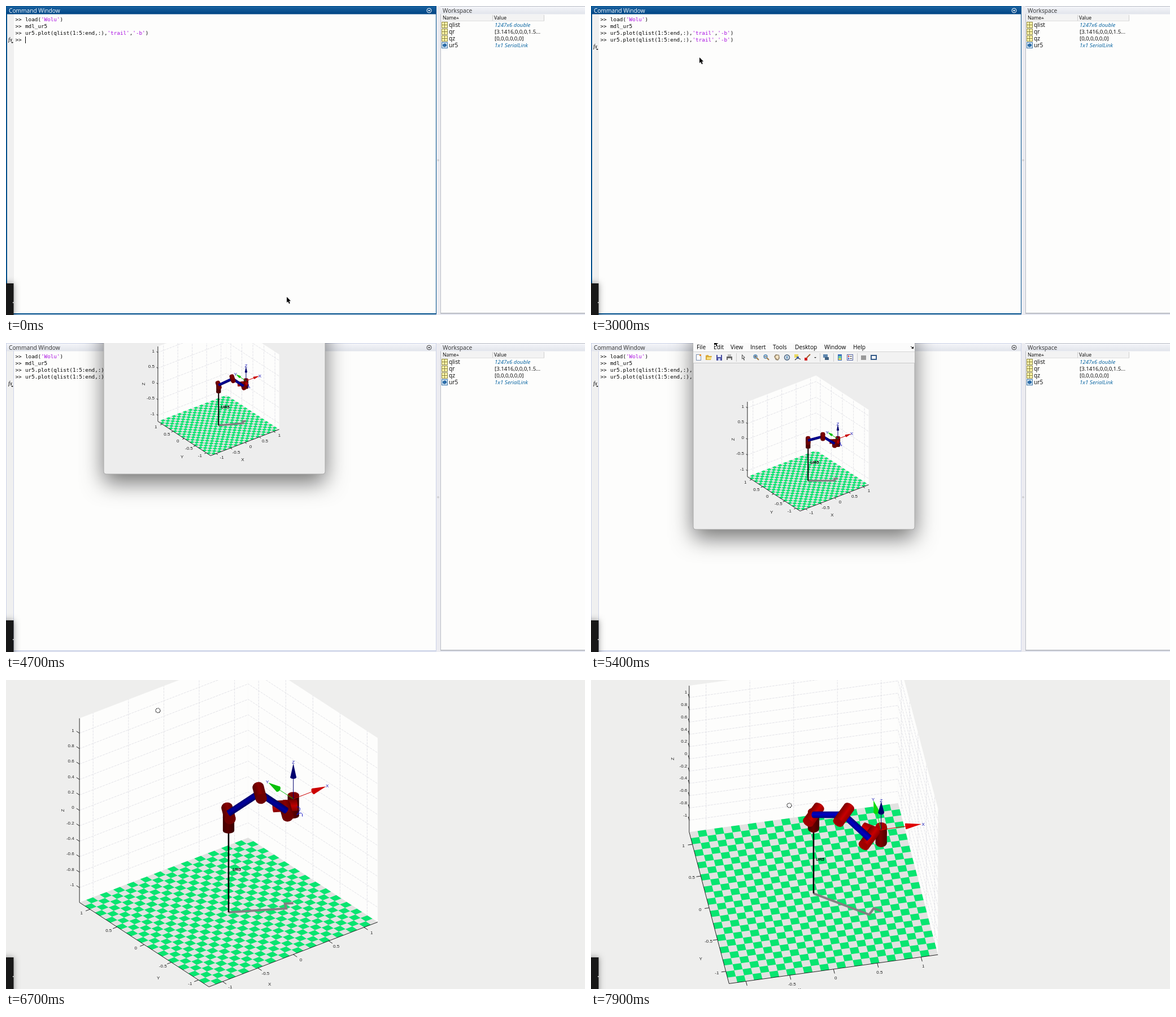
Recreate the animation shown at these times as an HTML page with a canvas. Size 1025x547 px, loop 8000 ms.

```html
<!DOCTYPE html>
<html lang="en">
<head>
<meta charset="utf-8">
<title>Robot arm plot</title>
<style>
html, body { margin: 0; width: 100%; height: 100%; overflow: hidden; background: #efefef; }
canvas { display: block; width: 1025px; height: 547px; }
</style>
</head>
<body>
<canvas id="stage" width="1025" height="547"></canvas>
<script>
const ctx = document.getElementById('stage').getContext('2d');
const LOOP = 8000, STEP = 100;
const R = 1.1928, TILES = 25; // half the plot's width, floor tiles per side
const UI = '10.2px "Open Sans", sans-serif';
const MONO = '9.3px "DejaVu Sans Mono", monospace';
const PLOT = '8px "Liberation Sans", Arial, sans-serif';
const { sin, cos, abs, hypot, atan2, PI } = Math;
const rad = d => d * PI / 180;
const mix = (a, b, k) => a + (b - a) * k;
const clamp = v => Math.max(0, Math.min(1, v));
const ramp = (t, a, b) => clamp((t - a) / (b - a));
const ease = k => k * k * (3 - 2 * k);
const add = (a, b, k = 1) => a.map((v, i) => v + b[i] * k);

// Interpolates rows of [time, ...values].
function track(t, rows) {
  let i = 0;
  while (i < rows.length - 2 && t >= rows[i + 1][0]) i++;
  const a = rows[i], b = rows[i + 1], k = ease(ramp(t, a[0], b[0]));
  return a.slice(1).map((v, n) => mix(v, b[n + 1], k));
}

function rect(x, y, w, h, fill) {
  ctx.fillStyle = fill;
  ctx.fillRect(x, y, w, h);
}
function line(pts, color, width = 1) {
  ctx.beginPath();
  pts.forEach(p => ctx.lineTo(p[0], p[1]));
  ctx.strokeStyle = color;
  ctx.lineWidth = width;
  ctx.stroke();
}
function poly(pts, fill) {
  ctx.beginPath();
  pts.forEach(p => ctx.lineTo(p[0], p[1]));
  ctx.closePath();
  ctx.fillStyle = fill;
  ctx.fill();
}
function ring(x, y, r, color, width = 1) {
  ctx.beginPath();
  ctx.arc(x, y, r, 0, 2 * PI);
  ctx.strokeStyle = color;
  ctx.lineWidth = width;
  ctx.stroke();
}
function text(s, x, y, font, fill = '#000', align = 'left') {
  ctx.font = font;
  ctx.fillStyle = fill;
  ctx.textAlign = align;
  ctx.fillText(s, x, y);
}

/* ---------- desktop ---------- */

function command(s, y) {
  let x = 34;
  text('>>', 16.5, y, MONO);
  for (const part of s.split(/('[^']*')/)) {
    text(part, x, y, MONO, part[0] === "'" ? '#a80be0' : '#000');
    x += ctx.measureText(part).width;
  }
}

function dropdown(x, color) {
  ring(x, 8, 4, color);
  poly([[x - 2, 7], [x + 2, 7], [x, 10]], color);
}

function header(x, w, title, active) {
  const g = ctx.createLinearGradient(0, 1, 0, 14);
  g.addColorStop(0, active ? '#1b62a0' : '#f4f5f9');
  g.addColorStop(1, active ? '#004585' : '#e2e5ec');
  rect(x, 1, w, 13.5, g);
  text(title, x + 4, 11.5, UI, active ? '#fff' : '#333');
}

function varIcon(y, object) {
  rect(771, y - 5, 11, 11, object ? '#3b74a8' : '#8a8440');
  rect(772, y - 4, 9, 9, object ? '#dbeaf5' : '#fff6a8');
  if (object) {
    poly([[773, y - 1], [777, y - 3], [780, y - 1], [780, y + 2], [776, y + 4], [773, y + 2]], '#2c6ca8');
  } else {
    rect(776, y - 4, 1, 9, '#8a8440');
    rect(772, y, 9, 1, '#8a8440');
  }
}

function desktop(t, active) {
  rect(0, 0, 1044, 547, '#e9ebf3');
  const edge = active ? '#00508c' : '#ccd3e8';
  rect(0, 0, 762, 546, edge);
  rect(active ? 2 : 1, 14, 12, 530, '#f0f0f0');
  rect(14, 14, 747, 530, '#fdfdfc');
  header(1, 760, 'Command Window', active);
  dropdown(749, active ? '#fff' : '#444');

  const plotCmd = "ur5.plot(qlist(1:5:end,:),'trail','-b')";
  command("load('Wolu')", 27);
  command('mdl_ur5', 39);
  command(plotCmd, 51);
  command(t < 2200 ? '' : plotCmd, 63);
  const done = t >= 2900;
  if (!done) rect(t < 2200 ? 34 : 253, 54, 1, 12, '#000');
  const fy = done ? 72 : 60;
  text('fx', 4, fy + 3, 'italic 10px "Liberation Serif", serif');
  poly([[9, fy + 4], [13, fy + 4], [11, fy + 6]], '#000');

  rect(762, 0, 7, 547, '#ececf1');
  ring(765, 273, 1.3, '#aaa', .6);
  rect(769, 0, 275, 545, '#b9bcc4');
  rect(770, 14, 272, 529, '#fdfdfc');
  header(769, 273, 'Workspace', false);
  dropdown(1031, '#444');
  rect(770, 15, 183, 11, '#f3f3f3');
  rect(861, 16, 1, 10, '#cfcfcf');
  rect(952, 16, 1, 10, '#cfcfcf');
  rect(770, 26, 183, 1, '#dedede');
  const small = '8.6px "Open Sans", sans-serif';
  text('Name', 773, 24, small);
  poly([[797, 23], [799.5, 19], [802, 23]], '#777');
  text('Value', 864, 24, small);
  [['qlist', '1247x6 double', 1], ['qr', '[3.1416,0,0,0,1.5...'],
   ['qz', '[0,0,0,0,0,0]'], ['ur5', '1x1 SerialLink', 1]].forEach(([name, value, it], i) => {
    const y = 33 + 12 * i;
    varIcon(y, i === 3);
    text(name, 784, y + 3.5, UI);
    text(value, 865, y + 3.5, (it ? 'italic ' : '') + '9.7px "Open Sans", sans-serif', it ? '#00609f' : '#000');
  });
}

function sideTab() {
  ctx.save();
  ctx.shadowColor = 'rgba(0,0,0,.4)';
  ctx.shadowBlur = 12;
  rect(-10, 491, 23.5, 70, '#181818');
  ctx.restore();
  rect(12, 524, 1.5, 2, '#ddd');
}

/* ---------- 3D plot ---------- */

function camera(cx, cy, s, az, el) {
  const sa = sin(rad(-az)), ca = cos(rad(az)), se = sin(rad(el)), ce = cos(rad(el));
  const at = ([x, y, z]) => {
    const back = x * sa + y * ca;
    return [cx + s * (x * ca - y * sa), cy - s * (se * back + ce * z), se * z - ce * back];
  };
  const dir = v => {
    const p = at(v), dx = p[0] - cx, dy = p[1] - cy, l = hypot(dx, dy) || 1;
    return [dx / l, dy / l];
  };
  return { at, dir, s, light: clamp((el - 30) / 16.5) };
}

function cylinder(cam, a, b, r, rgb, level, capLevel) {
  let p = cam.at(a), q = cam.at(b);
  if (p[2] > q[2]) [p, q] = [q, p];
  const len = hypot(...add(b, a, -1)), w = r * cam.s;
  const ang = atan2(q[1] - p[1], q[0] - p[0]), k = abs(q[2] - p[2]) / len;
  const nx = -sin(ang) * w, ny = cos(ang) * w;
  const tone = v => `rgb(${rgb.map(c => Math.min(255, c * v)).join()})`;
  const g = ctx.createLinearGradient(p[0] - nx, p[1] - ny, p[0] + nx, p[1] + ny);
  g.addColorStop(0, tone(level * .7));
  g.addColorStop(.45, tone(level));
  g.addColorStop(1, tone(level * .6));
  const cap = (c, fill) => {
    ctx.beginPath();
    ctx.ellipse(c[0], c[1], w * k, w, ang, 0, 2 * PI);
    ctx.fillStyle = fill;
    ctx.fill();
  };
  cap(p, g);
  poly([[p[0] - nx, p[1] - ny], [q[0] - nx, q[1] - ny], [q[0] + nx, q[1] + ny], [p[0] + nx, p[1] + ny]], g);
  cap(q, tone(capLevel));
}

function arrow(cam, from, axis, color, name) {
  const tip = cam.at(add(from, axis, .46)), base = cam.at(add(from, axis, .28)), o = cam.at(from);
  line([o, base], color, 1);
  const ang = atan2(tip[1] - base[1], tip[0] - base[0]);
  const k = abs(tip[2] - base[2]) / .18, w = .034 * cam.s;
  const nx = -sin(ang) * w, ny = cos(ang) * w;
  poly([[base[0] + nx, base[1] + ny], tip, [base[0] - nx, base[1] - ny]], color);
  ctx.beginPath();
  ctx.ellipse(base[0], base[1], w * k, w, ang, 0, 2 * PI);
  ctx.fill();
  const l = cam.at(add(from, axis, .48));
  text(name, l[0], l[1] + 3, PLOT, '#1414b4', 'center');
}

function pose(t) {
  const [turn, lift, drop] = track(t, [
    [3900, -32, 20, -38], [4700, -28, 23, -40], [5400, -37, 17, -35],
    [6200, -37, 28.6, -34], [6700, -30, 34, -40], [7900, -38.5, 26, -34.5]
  ]);
  const a = rad(turn);
  const along = e => [cos(a) * cos(rad(e)), sin(a) * cos(rad(e)), sin(rad(e))];
  const hinge = [-sin(a), cos(a), 0], reach = along(0), up = [0, 0, 1];
  const shoulder = [0, 0, .089];
  const elbow = add(shoulder, along(lift), .425);
  const wrist = add(elbow, along(drop), .392);
  const w2 = add(wrist, hinge, .109), w3 = add(w2, reach, .0947), tool = add(w3, up, .0823);
  return { hinge, reach, up, shoulder, elbow, wrist, w2, w3, tool };
}

function arm(cam, t) {
  const J = pose(t), L = cam.light;
  const flat = v => [v[0], v[1], -R];
  const big = cam.s > 100;
  const o = cam.at([0, 0, -R]);
  line([J.shoulder, J.wrist, J.w2, J.w3].map(v => cam.at(flat(v))), '#808080', big ? 4 : 3.2);
  line([o, cam.at([0, 0, 0])], '#000', big ? 2.6 : 2);
  text('UR5', o[0] + mix(big ? 7 : 4, 4, L), cam.at([0, 0, -.66])[1], 'italic bold 7.5px "Liberation Sans", sans-serif');

  const parts = [];
  const joint = (c, ax, level) => {
    const capLevel = level * (ax === J.up ? 1.35 : .8);
    parts.push([add(c, ax, -.135), add(c, ax, .135), .064, [210, 0, 0], level, capLevel]);
  };
  const link = (a, b) => parts.push([a, b, .037, [0, 0, 220], mix(.72, .9, L), .6]);
  joint([0, 0, 0], J.up, mix(.42, .5, L));
  joint(J.shoulder, J.hinge, mix(.65, .95, L));
  joint(J.elbow, J.hinge, mix(.65, .95, L));
  joint(J.wrist, J.hinge, mix(.65, .95, L));
  joint(J.w2, J.reach, mix(.9, 1, L));
  joint(J.w3, J.up, mix(.45, .6, L));
  link(J.shoulder, J.elbow);
  link(J.elbow, J.wrist);
  const depth = p => cam.at(add(p[0], p[1]))[2];
  parts.sort((a, b) => depth(a) - depth(b)).forEach(p => cylinder(cam, ...p));

  arrow(cam, J.tool, [1, 0, 0], L > .5 ? '#e00000' : '#cc0000', 'X');
  arrow(cam, J.tool, [0, 1, 0], L > .5 ? '#10dc10' : '#08c008', 'Y');
  arrow(cam, J.tool, [0, 0, 1], '#00006e', 'Z');
  if (L < .3) {
    const [x, y] = cam.at(J.tool), k = cam.s / 157;
    ctx.beginPath();
    ctx.moveTo(x + 6 * k, y + 14 * k);
    ctx.quadraticCurveTo(x + 16 * k, y + 14 * k, x + 9 * k, y + 24 * k);
    ctx.lineTo(x + 6 * k, y + 28 * k);
    ctx.quadraticCurveTo(x + 17 * k, y + 20 * k, x + 16 * k, y + 31 * k);
    ctx.strokeStyle = '#1414c8';
    ctx.lineWidth = 1;
    ctx.stroke();
  }
}

function floorTiles(at) {
  const size = 2 * R / TILES;
  ctx.beginPath();
  for (let i = 0; i < TILES; i++) {
    for (let j = 1 - i % 2; j < TILES; j += 2) {
      const x = -R + i * size, y = -R + j * size;
      [[x, y], [x + size, y], [x + size, y + size], [x, y + size]].forEach((c, n) => {
        const p = at([...c, -R]);
        n ? ctx.lineTo(p[0], p[1]) : ctx.moveTo(p[0], p[1]);
      });
      ctx.closePath();
    }
  }
  ctx.fillStyle = '#08e570';
  ctx.fill();
}

function plot(cam, t) {
  const { at, dir } = cam, big = cam.s > 100;
  const fill = (pts, c) => poly(pts.map(at), c);
  fill([[-R, R, -R], [R, R, -R], [R, R, R], [-R, R, R]], '#fdfdfc');
  fill([[R, R, -R], [R, -R, -R], [R, -R, R], [R, R, R]], '#fdfdfc');

  const ticks = [-1, -.5, 0, .5, 1];
  const zTicks = big ? Array.from({ length: 11 }, (_, i) => (i - 5) / 5) : ticks;
  ctx.setLineDash([4, 1.5]);
  const grid = pts => line(pts.map(at), '#dcdce3', .8);
  for (const v of ticks) {
    grid([[v, R, -R], [v, R, R]]);
    grid([[R, v, -R], [R, v, R]]);
  }
  for (const z of zTicks) grid([[-R, R, z], [R, R, z], [R, -R, z]]);
  ctx.setLineDash([]);

  fill([[-R, -R, -R], [R, -R, -R], [R, R, -R], [-R, R, -R]], '#e2e2e1');
  floorTiles(at);

  line([[-R, R, R], [-R, R, -R], [-R, -R, -R], [R, -R, -R]].map(at), '#222', 1);
  const len = big ? 8 : 3.5, gap = big ? 16 : 12;
  function tick(v, d, label, z) {
    const p = at(v);
    line([p, add(p.slice(0, 2), d, z ? len * .8 : len)], '#222', 1);
    const q = add(p.slice(0, 2), d, z ? (big ? 10 : 6) : gap);
    text(label, q[0] - (z ? 1 : 0), q[1] + 3, PLOT, '#222', z ? 'right' : 'center');
  }
  for (const v of ticks) {
    tick([v, -R, -R], dir([0, -1, 0]), v);
    tick([-R, v, -R], dir([-1, 0, 0]), v);
  }
  for (const z of zTicks) tick([-R, R, z], dir([0, 1, 0]), z, true);

  const L = cam.light;
  const name = (s, v, dx, dy) => {
    const p = at(v);
    text(s, p[0] + dx, p[1] + dy + 3, PLOT, '#222', 'center');
  };
  name('X', [0, -R, -R], big ? mix(-42, -60, L) : -4, big ? mix(52, 36, L) : 30);
  name('Y', [-R, 0, -R], big ? mix(25, -15, L) : -4, big ? mix(59, 90, L) : 32);
  const z = at([-R, R, 0]);
  ctx.save();
  ctx.translate(z[0] - (big ? 30 : 26), z[1]);
  ctx.rotate(-PI / 2);
  text('Z', 0, 3, PLOT, '#222', 'center');
  ctx.restore();

  arm(cam, t);
}

/* ---------- figure window ---------- */

const WIN = { x: 181, y: -29, w: 392, h: 359 };
const smallPlot = t => plot(camera(384.3, 177.5, 64.2, -37.5, 30), t);

function toolbar() {
  const lens = (x, plus) => {
    ring(x - 1, 24, 3, '#4a86b8', 1.3);
    line([[x + 1, 26], [x + 5, 30]], '#a07840', 2);
    line([[x - 3, 24], [x + 1, 24]], '#333', 1);
    if (plus) line([[x - 1, 22], [x - 1, 26]], '#333', 1);
  };
  rect(186, 20, 9, 11, '#7c90b0'); rect(187, 21, 7, 9, '#fff'); rect(192, 20, 3, 3, '#e89030');
  poly([[203, 22], [207, 21], [209, 23], [214, 23], [212, 30], [203, 30]], '#d8a838');
  rect(205, 25, 8, 4, '#f8e080');
  rect(222, 21, 10, 10, '#4a50a0'); rect(224, 21, 6, 4, '#e8ecff'); rect(225, 27, 4, 4, '#c8d0f0');
  rect(240, 24, 10, 6, '#666'); rect(242, 20, 6, 4, '#bbb'); rect(242, 27, 6, 3, '#eee');
  rect(257, 18, 1, 15, '#ccc');
  poly([[267, 20], [267, 29], [269, 27], [271, 31], [272, 30], [270.5, 26.5], [273, 26]], '#444');
  poly([[268, 22], [268, 27], [271, 25.5]], '#fff');
  lens(292, true);
  lens(310, false);
  poly([[324, 24], [327, 20], [333, 21], [334, 27], [331, 31], [327, 30]], '#9a8a70');
  poly([[326, 25], [328, 22], [332, 22], [332, 27], [330, 29]], '#f6e4c4');
  ring(347, 25.5, 4.5, '#3a5878', 1.4); rect(345, 23, 4, 5, '#8ab0d0');
  rect(360, 20, 7, 6, '#e8d860'); line([[361, 30], [366, 26], [371, 29]], '#333', 1.3); rect(364, 24, 4, 4, '#4060a0');
  line([[388, 20], [382, 26]], '#a06030', 2); rect(378, 26, 5, 5, '#d02020');
  poly([[395, 25], [399, 25], [397, 27]], '#333');
  rect(405, 18, 1, 15, '#ccc');
  rect(411, 20, 8, 6, '#6088b0'); rect(414, 25, 7, 5, '#406080');
  rect(429, 18, 1, 15, '#ccc');
  rect(437, 20, 7, 11, '#3c70c0'); rect(438, 23, 5, 4, '#70d0a0'); rect(438, 27, 5, 3, '#e8d050');
  rect(453, 20, 11, 11, '#5060a0'); rect(454, 21, 9, 9, '#fff');
  rect(455, 22, 2, 3, '#d04040'); rect(455, 26, 2, 3, '#4060d0'); rect(458, 23, 4, 1, '#444'); rect(458, 27, 4, 1, '#444');
  rect(471, 18, 1, 15, '#ccc');
  rect(478, 22, 9, 8, '#999');
  rect(495, 21, 11, 9, '#345a88'); rect(497, 23, 7, 5, '#fff');
}

function windowBody(t) {
  rect(WIN.x, WIN.y, WIN.w, 44, '#fbfbfb');
  rect(WIN.x, 15, WIN.w, 20, '#f2f2f2');
  rect(WIN.x, 15, WIN.w, 1, '#d4d4d4');
  rect(WIN.x, 35, WIN.w, 1, '#c9c9c9');
  const menu = { File: 187, Edit: 217, View: 247, Insert: 282, Tools: 322, Desktop: 361, Window: 413, Help: 464 };
  for (const m in menu) text(m, menu[m], 11, UI);
  line([[566, 6], [570, 9]], '#000', 1);
  poly([[571, 6], [571, 10], [567, 10]], '#000');
  toolbar();
  smallPlot(t);
}

function frame(x, y, w, h) {
  ctx.save();
  ctx.shadowColor = 'rgba(0,0,0,.55)';
  ctx.shadowBlur = 38;
  ctx.shadowOffsetY = 15;
  ctx.beginPath();
  ctx.roundRect(x, y, w, h, 4);
  ctx.fillStyle = '#ededed';
  ctx.fill();
  ctx.restore();
  ctx.strokeStyle = '#a8a8a8';
  ctx.lineWidth = 1;
  ctx.stroke();
}

function scaled(x, y, sx, sy, draw) {
  ctx.save();
  ctx.translate(x, y);
  ctx.scale(sx, sy);
  ctx.translate(-WIN.x, -WIN.y);
  draw();
  ctx.restore();
}

function floating(t) {
  const k = 1 - ease(ramp(t, 4700, 5300));
  const dx = -8 * k, dy = -98 * k;
  frame(WIN.x + dx, WIN.y + dy, WIN.w, WIN.h);
  ctx.save();
  ctx.translate(dx, dy);
  windowBody(t);
  ctx.restore();
}

// The window grows to fill the screen while the desktop slides away.
function expanding(t) {
  const p = ease(ramp(t, 5800, 6660));
  const x = mix(WIN.x, -304, p), y = mix(WIN.y, -167, p);
  const w = mix(WIN.w, 1348, p), h = mix(WIN.h, 790, p);
  rect(0, 0, 1025, 547, '#000');
  ctx.save();
  ctx.translate(-1348 * ramp(t, 6000, 6650) ** 2.2, 0);
  desktop(t, false);
  ctx.restore();
  frame(x, y, w, h);
  scaled(x, y, w / WIN.w, h / WIN.h, () => windowBody(t));
  ctx.globalAlpha = ramp(t, 5800, 6300);
  rect(x, y, w, h - 1, '#ededed');
  scaled(x, y, w / 1348, h / 790, () => smallPlot(t));
  ctx.globalAlpha = 1;
}

function fullscreen(t) {
  rect(0, 0, 1025, 547, '#eeeeed');
  const k = ease(ramp(t, 7150, 7950));
  const turn = k / ease(ramp(7900, 7150, 7950));
  plot(camera(394, 248.2, 157.8, mix(-37.5, -10.8, turn), mix(30, 46.5, turn)), t);
  sideTab();
  const [x, y] = track(t, [[6600, 258, 40], [6700, 269, 54], [7200, 290, 92], [7900, 351, 222]]);
  ring(x, y, 4, '#fff', 2.5);
  ctx.setLineDash([2, 1]);
  ring(x, y, 4, '#111', 1.2);
  ctx.setLineDash([]);
}

function pointer(t) {
  const [x, y] = track(t, [
    [500, 497, 515], [1900, 192, 91], [3200, 192, 91], [4000, 210, -104],
    [4700, 210, -104], [5300, 218, -6], [6200, 219.5, -6]
  ]);
  const pts = [[0, 0], [0, 10], [2.3, 8], [4, 12], [5.8, 11.2], [4.2, 7.3], [7.2, 7.2]].map(p => [p[0] + x, p[1] + y]);
  line([...pts, pts[0]], '#fff', 1.6);
  poly(pts, '#000');
}

function draw(now) {
  const t = Math.floor(now % LOOP / STEP) * STEP;
  ctx.clearRect(0, 0, 1025, 547);
  if (t >= 6600) {
    fullscreen(t);
  } else {
    if (t > 5800) {
      expanding(t);
    } else {
      desktop(t, t < 3900);
      if (t >= 3900) floating(t);
      sideTab();
    }
    pointer(t);
  }
}

const start = performance.now();
function tickFrame() {
  draw(performance.now() - start);
  requestAnimationFrame(tickFrame);
}
tickFrame();
</script>
</body>
</html>
```
